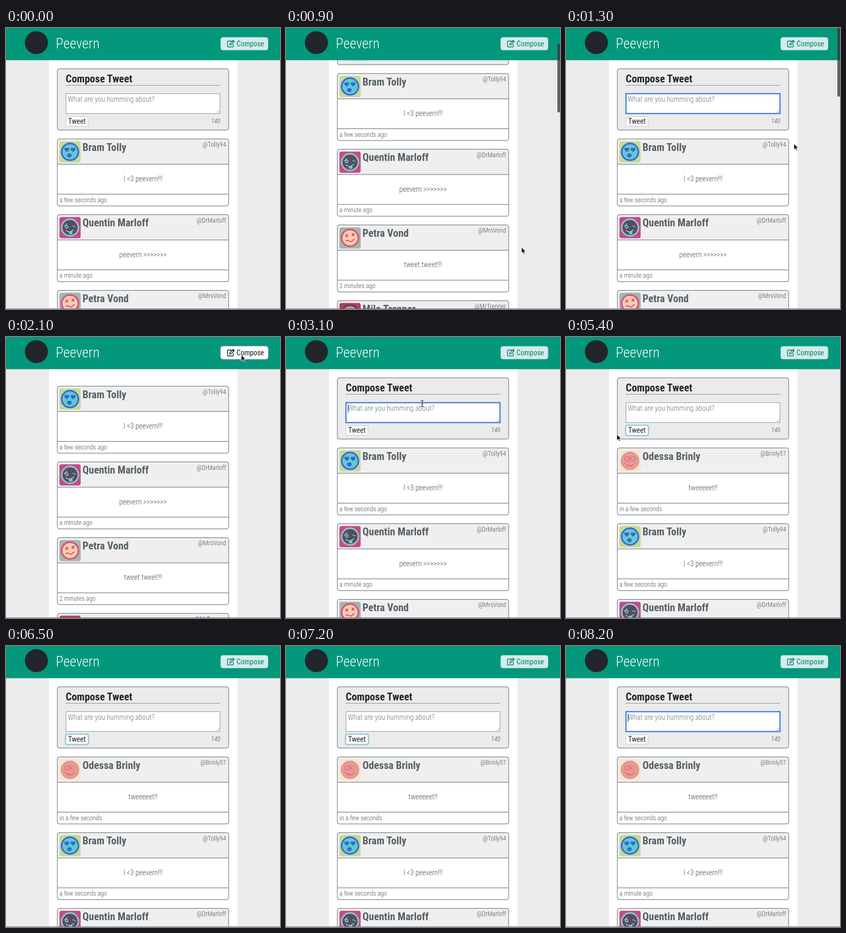
Write an HTML page that moves like this. It is 523 px wide and 537 px high and loops after 8.3 s.

```html
<!DOCTYPE html>
<html lang="en">
<head>
<meta charset="utf-8">
<title>Peevern</title>
<style>
html, body { margin: 0; width: 100%; height: 100%; overflow: hidden; background: #ebebeb; }
svg { display: block; }
text { font: 300 14px "Roboto Condensed", Roboto, sans-serif; font-stretch: condensed; fill: #45525a; white-space: pre; }
.title { font-size: 20px; font-weight: 700; fill: #212529; }
.name { font-size: 20px; font-weight: 700; fill: #566066; }
.small { font-size: 12.5px; }
.mid { text-anchor: middle; }
.end { text-anchor: end; }
.line { fill: none; stroke: #5b6670; }
#compose { color: #08806f; }
#compose.hover { color: #15181a; }
#compose text { fill: currentColor; font-weight: 400; }
#compose .box { fill: #d5ecea; stroke: #b9dfd9; }
#compose.hover .box { fill: #fff; stroke: #fff; }
#compose path { fill: none; stroke: currentColor; stroke-width: 1.4; stroke-linejoin: round; }
</style>
</head>
<body>
<svg width="523" height="537" viewBox="0 0 523 537">
  <rect width="523" height="537" fill="#ebebeb"/>
  <rect x="82" y="61" width="360" height="476" fill="#fff"/>
  <g id="page">
    <svg id="form" x="97" y="77" width="329" height="119">
      <rect id="panel" x="1" y="1" width="327" height="117" rx="4" class="line" style="fill:#ebebeb"/>
      <text x="17" y="27" class="title">Compose Tweet</text>
      <path d="M17 32.5H312" class="line" style="stroke:#8a9296"/>
      <rect id="field" x="17.5" y="48.5" width="294" height="38" fill="#fff"/>
      <path d="M305 85l5-5M308 85l2-2" stroke="#888" stroke-width=".8"/>
      <text id="draft" x="21" y="64"></text>
      <rect id="caret" y="53" width="1" height="15" fill="#222"/>
      <rect id="ring" x="15.5" y="90.5" width="46" height="22" rx="4" fill="#86cfe4"/>
      <rect x="17.5" y="92.5" width="42" height="18" rx="3" fill="#fff" stroke="#c3cbcf"/>
      <text x="38.5" y="106" class="mid" style="font-weight:400;fill:#222">Tweet</text>
      <text id="count" x="312" y="105" class="small end" style="font-style:italic"></text>
    </svg>
    <g id="feed"></g>
  </g>
  <rect width="523" height="61.5" fill="#03977c"/>
  <circle cx="58" cy="28" r="22" fill="#22262a"/>
  <text x="95" y="39" style="font-size:27px;fill:#f2fbf9">Peevern</text>
  <g id="compose">
    <rect id="outline" x="408.5" y="15.5" width="93" height="29" rx="3" fill="none" stroke="#75629b" stroke-width="1.4" stroke-dasharray="2 1.5"/>
    <rect class="box" x="410" y="18" width="90" height="24" rx="4"/>
    <path d="M431 25H424Q422.7 25 422.7 26.3V35Q422.7 36.3 424 36.3H432.5Q433.8 36.3 433.8 35V31M427 32.5l.5-2.7 6.2-6.2 2.2 2.2-6.2 6.2zM432.2 25.1l2.2 2.2"/>
    <text x="440" y="35">Compose</text>
  </g>
  <rect id="scrollbar" x="518" width="6" height="131" rx="2" fill="#333" opacity=".75"/>
  <path d="M0 536.5H523" stroke="#777a8c"/>
  <path id="arrow" d="M0 0V11.5L2.7 9.2 4.6 13.3 6.6 12.4 4.8 8.4H8.4Z" fill="#111" stroke="#fff" stroke-width=".9"/>
  <path id="beam" d="M-2.5-6Q0-6 0-4.5Q0-6 2.5-6M0-4.5V4.5M-2.5 6Q0 6 0 4.5Q0 6 2.5 6M-1.5 1.5H1.5" fill="none" stroke="#222" stroke-width="1.1"/>
</svg>
<script>
const LOOP = 8300, PITCH = 144.7, MESSAGE = 'tweeeeet!!';
const $ = id => document.getElementById(id);
const show = (id, on) => $(id).style.display = on ? '' : 'none';
const clamp = v => Math.min(1, Math.max(0, v));
const ease = v => .5 - Math.cos(Math.PI * clamp(v)) / 2;

const heart = (x, y) => `M${x} ${y + 3.5}l-3.5-3.5q-1-3 1.5-3 1.5 0 2 1.5 .5-1.5 2-1.5 2.5 0 1.5 3z`;
const cross = (x, y) => `M${x - 2.5} ${y - 2.5}l5 5m0-5l-5 5`;
const faces = {
  hearts: `<path d="${heart(14, 16)}${heart(26, 16)}" fill="var(--m)"/><ellipse cx="19" cy="27" rx="3.5" ry="3" fill="var(--m)"/>`,
  wink: '<path d="M9 18l6-5M25 17l6 2M12 25q6 7 16-1" /><circle cx="14" cy="19" r="2.5"/><path d="M19 28v4h5v-6" fill="var(--m)"/>',
  crosses: `<path d="${cross(14, 16)}${cross(26, 14)}M12 27q3-4 6-1t6 0 5-3"/>`,
  speckled: '<g stroke-dasharray="2 1.4"><circle cx="14" cy="16" r="4"/><circle cx="26" cy="16" r="4"/><path d="M10 24q10 10 20 0M14 29q6 3 12 0M20 10v13"/></g>'
};
const tweets = [
  ['Odessa Brinly', '@Brinly57', MESSAGE, 'speckled', '#fae4cc', '#d2a08f', '#eb9a9c', '#d8606d'],
  ['Bram Tolly', '@Tolly94', 'I <3 peevern!!!', 'hearts', '#c6da92', '#4069dc', '#5fcbd0', '#3c63d2'],
  ['Quentin Marloff', '@DrMarloff', 'peevern >>>>>>>', 'wink', '#c64987', '#91bfca', '#50505f', '#91bfca'],
  ['Petra Vond', '@MrsVond', 'tweet tweet!!!', 'crosses', '#a5b4b2', '#d95475', '#f8ceb0', '#d04468'],
  ['Milo Trenner', '@MrTrenner', 'tweet!', 'wink', '#b83b5e', '#54444e', '#d48a96', '#54444e']
];
const ages = ['in a few seconds', 'a few seconds ago', 'a minute ago', '2 minutes ago', '3 minutes ago'];

$('feed').innerHTML = tweets.map(([name, handle, body, face, bg, ring, skin, mark], i) => `
  <g transform="translate(98 ${212 + (i - 1) * PITCH})">
    <rect width="327" height="128" rx="4" fill="#fff"/>
    <path d="M0 48V4Q0 0 4 0H323Q327 0 327 4V48z" fill="#efefef"/>
    <path d="M0 48.3H327M0 105.5H327" class="line"/>
    <rect width="327" height="128" rx="4" class="line"/>
    <g transform="translate(4 4.5)" style="--m:${mark}" fill="none" stroke="${mark}" stroke-width="1.6">
      <rect width="40.5" height="40.5" rx="4" fill="${bg}" stroke="none"/>
      <circle cx="20.2" cy="20.2" r="16" fill="${skin}" stroke="${ring}" stroke-width="3.2"/>
      ${faces[face]}
    </g>
    <text x="48" y="22.5" class="name">${name}</text>
    <text x="322" y="15" class="small end">${handle}</text>
    <text x="163.5" y="81" class="mid">${body.replace('<', '&lt;')}</text>
    <text x="4" y="120.5" class="small age"></text>
  </g>`).join('');
const cards = [...$('feed').children];

// time, x, y of the pointer
const path = [
  [600, 470, 530], [1000, 446, 400], [1300, 435, 221], [1600, 449, 34], [2450, 449, 34],
  [2950, 260, 127], [4550, 260, 127], [4800, 135, 179], [5050, 135, 179], [5400, 97, 186], [5800, -20, 170]
];
function pointer(t) {
  const i = path.findIndex(p => p[0] > t);
  if (i < 1) return null;
  const [a, b] = [path[i - 1], path[i]], k = ease((t - a[0]) / (b[0] - a[0]));
  return { x: a[1] + (b[1] - a[1]) * k, y: a[2] + (b[2] - a[2]) * k };
}

function draw(t) {
  const open = 1 - ease((t - 1650) / 400) + ease((t - 2350) / 400);
  const scroll = 250 * (ease((t - 150) / 400) - ease((t - 700) / 400));
  const posted = t >= 4950, reloaded = t >= 7400;
  const typed = posted ? 0 : Math.floor(clamp((t - 3250) / 1200) * MESSAGE.length);
  const typing = t > 3200 && t < 4550;
  const focus = t >= 1100 && t < 1650 || t >= 2350 && t < 4950 || reloaded;

  $('page').setAttribute('transform', `translate(0 ${-scroll})`);
  $('form').setAttribute('height', 119 * open);
  $('panel').setAttribute('height', Math.max(0, 119 * open - 2));
  show('form', open > .01);
  $('feed').setAttribute('transform', `translate(0 ${118 * (open - 1) + (posted ? PITCH : 0)})`);
  cards.forEach((card, i) => card.querySelector('.age').textContent = ages[i + (reloaded ? 1 : 0)] || '4 minutes ago');
  cards[0].style.display = posted ? '' : 'none';

  const draft = $('draft');
  draft.textContent = typed ? MESSAGE.slice(0, typed) : 'What are you humming about?';
  draft.style.fill = typed ? '#222' : '#6b7476';
  $('count').textContent = 140 - typed;
  $('field').setAttribute('stroke', focus ? '#3678e4' : '#8a9b9a');
  $('field').setAttribute('stroke-width', focus ? 2.2 : 1);
  show('caret', focus && open > .9 && (typing || (t + 250) % 1000 < 500));
  $('caret').setAttribute('x', 21 + (typed ? draft.getComputedTextLength() : 0));
  show('ring', posted && !reloaded);

  const p = pointer(t), inside = (x0, y0, x1, y1) => p && p.x > x0 && p.x < x1 && p.y > y0 && p.y < y1;
  const overField = inside(114, 125, 409, 164) && open > .9;
  $('compose').setAttribute('class', inside(410, 18, 500, 42) ? 'hover' : '');
  show('outline', t >= 1650 && t < 2350);
  show('arrow', p && !overField && !typing);
  show('beam', overField && !typing);
  if (p) for (const id of ['arrow', 'beam']) $(id).setAttribute('transform', `translate(${p.x} ${p.y})`);

  show('scrollbar', t >= 200 && t < 1600);
  $('scrollbar').setAttribute('y', scroll * .24);
}

const start = performance.now();
function tick(now) {
  const t = Math.max(0, now - start) % LOOP;
  draw(Math.floor(t / 100) * 100);
  requestAnimationFrame(tick);
}
requestAnimationFrame(tick);
</script>
</body>
</html>
```
